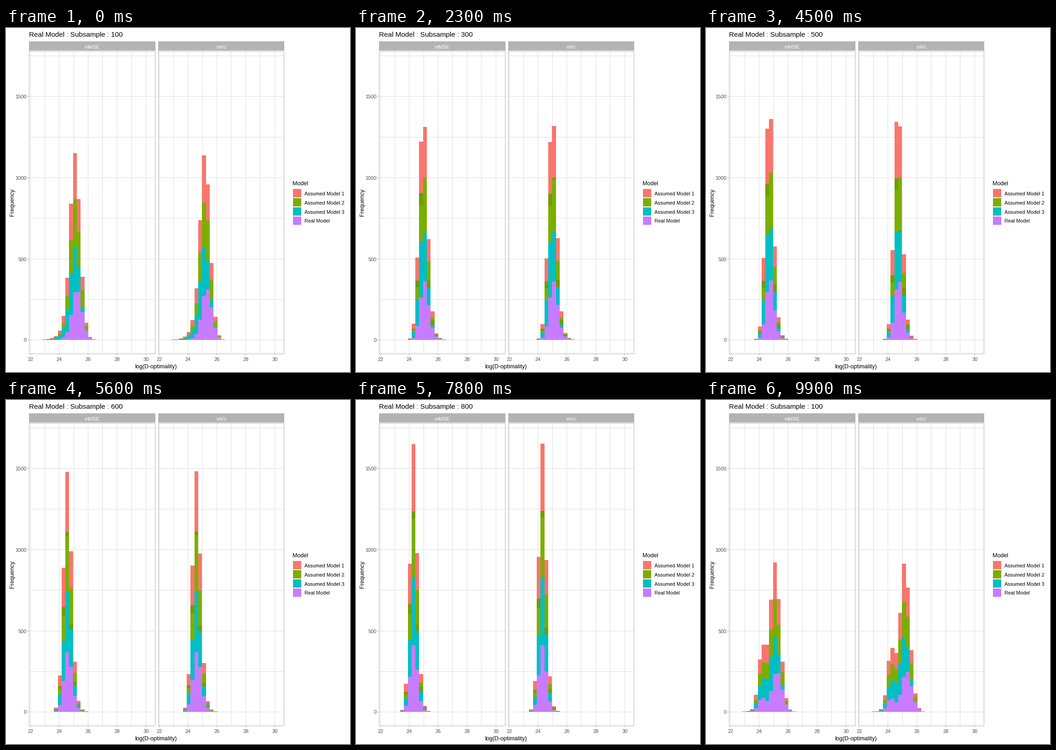
Animation of 748x748 px, one loop 10 s. Source, as a matplotlib script:

```python
from math import erf

import numpy as np
import matplotlib.pyplot as plt
from matplotlib.animation import FuncAnimation
from matplotlib.collections import PolyCollection
from matplotlib.patches import Rectangle

SIZE, DPI = 748, 64
PX = 72 / DPI
BINS, BIN_W = 17, 8.318
BIN_X = (70.95, 351.45)
Y0, Y_UNIT = 678, 0.353
RED, GREEN, TEAL, PURPLE = "#F8766D", "#7CAE00", "#00BFC4", "#C77CFF"
FRESH = "#739B00"
GREY, GRID, LABEL = "#B3B3B3", "#DEDEDE", "#4D4D4D"

# Median (in bins) and sharpness of the distribution for each subsample size
MEDIANS = ((9.46, 9.92, 9.11, 8.66, 8.07, 7.59, 7.04, 6.55, 6.08),
           (9.66, 9.95, 9.12, 8.63, 8.00, 7.57, 6.98, 6.51, 6.08))
SHARPNESS = (0.74, 0.90, 0.92, 0.94, 0.98, 0.97, 1.03, 1.09, 1.09)
STATES = len(SHARPNESS)

normal_cdf = np.vectorize(lambda z: 0.5 * (1 + erf(z / np.sqrt(2))))


def histogram(state, panel):
    """Stack tops per bin, from all models down to the real model alone."""
    edge = np.arange(BINS + 1) - MEDIANS[panel][state]
    left, right = (0.5, 0.1) if state == 0 else (0.1, 0.45)
    tail = np.where(edge < 0, left, right)
    z = SHARPNESS[state] * np.arcsinh(tail * edge) / tail
    total = 4000 * np.diff(normal_cdf(z))
    mid = edge[:-1] + 0.5
    tilts = (0.1, 0.04, 0.05 * (8.5 - state))
    parts = [total / (1 + odds * np.exp(-tilt * mid))
             for odds, tilt in zip((1 / 3, 1, 3), tilts)]
    return np.round([total, *parts])


# Indexed [state, stack level, panel, bin]
tops = np.array([[histogram(s, p) for p in (0, 1)]
                 for s in range(STATES)]).transpose(0, 2, 1, 3)

STARTS = np.array([6, 18, 30, 41, 52, 63, 74, 85, 96])
STEPS = (6, 6, 5, 5, 5, 5, 5, 5, 5)

plt.rcParams["font.family"] = "Liberation Sans"
fig = plt.figure(figsize=(SIZE / DPI, SIZE / DPI), dpi=DPI, facecolor="white")
ax = fig.add_axes([0, 0, 1, 1])
ax.set(xlim=(0, SIZE), ylim=(SIZE, 0))
ax.axis("off")


def text(x, y, s, px, color="black", **kw):
    return ax.text(x, y, s, fontsize=px * PX, color=color, **kw)


def line(xs, ys, color, z=1):
    ax.plot(xs, ys, color=color, lw=PX, zorder=z, snap=False,
            solid_capstyle="butt", solid_joinstyle="miter")


def box(x, y, w, h, color):
    ax.add_patch(Rectangle((x, y), w, h, fc=color, lw=0, antialiased=False))


def y_of(v):
    return Y0 - Y_UNIT * v


for left, right, first, name in ((50, 325, 53, "mMSE"), (331, 605, 333, "mVc")):
    for v in range(0, 1751, 250):
        y = round(y_of(v)) + 0.5
        line([left, right], [y, y], GRID)
    for i in range(9):
        x = int(first + 31.375 * i) + 0.5
        line([x, x], [50, 708], GRID)
        if i % 2 == 0:
            line([x, x], [709, 712], GREY)
            text(x, 724, str(22 + i), 11, LABEL, ha="center")
    box(left, 29, right - left, 20, GREY)
    text((left + right) / 2, 44.5, name, 11.2, "white", ha="center")
    l, r, t, b = left + 0.5, right - 0.5, 50.5, 708.5
    line([l, r, r, l, l], [t, t, b, b, t], GREY, 5)

for v in range(0, 1501, 500):
    y = round(y_of(v)) + 0.5
    line([47, 50], [y, y], GREY)
    text(45, y + 4, str(v), 11, LABEL, ha="right")

title = text(50, 19, "", 15.2)
text(325.5, 740, "log(D-optimality)", 12.5, ha="center")
text(17, 379, "Frequency", 12.6, rotation=90, rotation_mode="anchor", ha="center")
text(623, 342, "Model", 12.5)
legend = (("Assumed Model 1", RED), ("Assumed Model 2", GREEN),
          ("Assumed Model 3", TEAL), ("Real Model", PURPLE))
for i, (name, color) in enumerate(legend):
    box(624, round(350 + 19.9 * i), 18, 18, color)
    text(649, 363.7 + 19.9 * i, name, 10.8)


def layer(color, z):
    c = PolyCollection([], facecolors=color, linewidths=0, antialiaseds=False, zorder=z)
    return ax.add_collection(c, autolim=False)


red, fresh, green, teal, purple = (
    layer(c, 2 + 0.1 * i) for i, c in enumerate((RED, FRESH, GREEN, TEAL, PURPLE)))


def bars(low, high):
    """Rectangles for both panels between two arrays of counts."""
    out = []
    for p, k in zip(*np.nonzero(high > low)):
        x = BIN_X[p] + BIN_W * k
        a, b = y_of(low[p, k]), y_of(high[p, k])
        out.append([(x, a), (x, b), (x + BIN_W, b), (x + BIN_W, a)])
    return out


def blend(a, b, p):
    return tops[a] + (tops[b] - tops[a]) * p


def draw(frame):
    move = int((STARTS <= frame).sum()) - 1
    if move < 0:
        a, b, p, step = 0, 0, 1, 0
    else:
        a, b, step = move, (move + 1) % STATES, 1 / STEPS[move]
        p = min(1, (frame - STARTS[move] + 1) * step)
    total, g, t, real = blend(a, b, p)
    red.set_verts(bars(g, total))
    teal.set_verts(bars(real, t))
    purple.set_verts(bars(np.zeros_like(real), real))
    if p == 1:
        # Resting bars show the part gained in the last step a little darker.
        _, old_g, old_t, _ = blend(a, b, 1 - step)
        fresh.set_verts(bars(t, g))
        green.set_verts(bars(np.maximum(t, old_t), np.minimum(g, old_g)))
    else:
        fresh.set_verts([])
        green.set_verts(bars(t, g))
    near = b if p > 0.49 else a
    title.set_text(f"Real Model : Subsample : {100 * (near + 1)}")
    return red, fresh, green, teal, purple, title


anim = FuncAnimation(fig, draw, frames=100, interval=100, repeat=True, repeat_delay=0)
plt.show()
```
